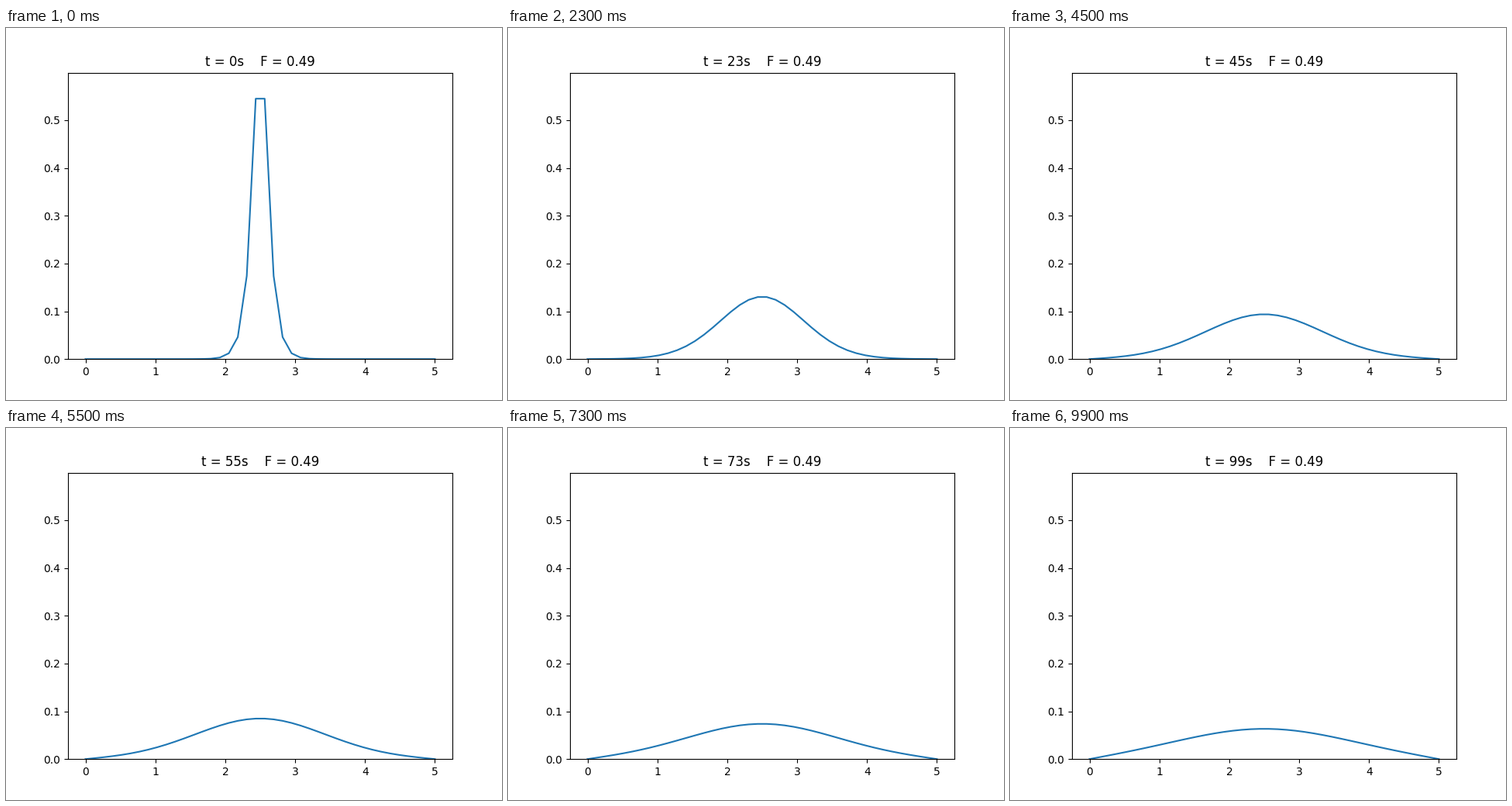
A matplotlib script that plays this animation: 640 px wide and 480 px high, repeating every 10 s.

```python
import numpy as np
import matplotlib.pyplot as plt
from matplotlib.animation import FuncAnimation

# 1D diffusion, backward Euler, fixed ends
L, N = 5.0, 40
D, DT = 0.008, 1.0
SIGMA = 0.08
STEPS = 100

x = np.linspace(0, L, N)
F = D * DT / (x[1] - x[0]) ** 2


def implicit_matrix(n, f):
    a = (1 + 2 * f) * np.eye(n) - f * (np.eye(n, k=1) + np.eye(n, k=-1))
    a[0], a[-1] = 0, 0
    a[0, 0] = a[-1, -1] = 1
    return a


def solve():
    a = implicit_matrix(N, F)
    u = np.exp(-((x - L / 2) ** 2) / (2 * SIGMA ** 2))
    history = []
    for _ in range(STEPS):
        u[0] = u[-1] = 0
        u = np.linalg.solve(a, u)
        history.append(u.copy())
    return history


profiles = solve()

fig, ax = plt.subplots(figsize=(6.4, 4.8), dpi=100)
line, = ax.plot(x, profiles[0])
ax.set_ylim(0, 1.1 * profiles[0].max())
title = ax.set_title("")


def update(i):
    line.set_ydata(profiles[i])
    title.set_text(f"t = {i}s    F = {F:.2f}")
    return line, title


anim = FuncAnimation(fig, update, frames=STEPS, interval=100,
                     repeat=True, repeat_delay=0, blit=False)
plt.show()
```
